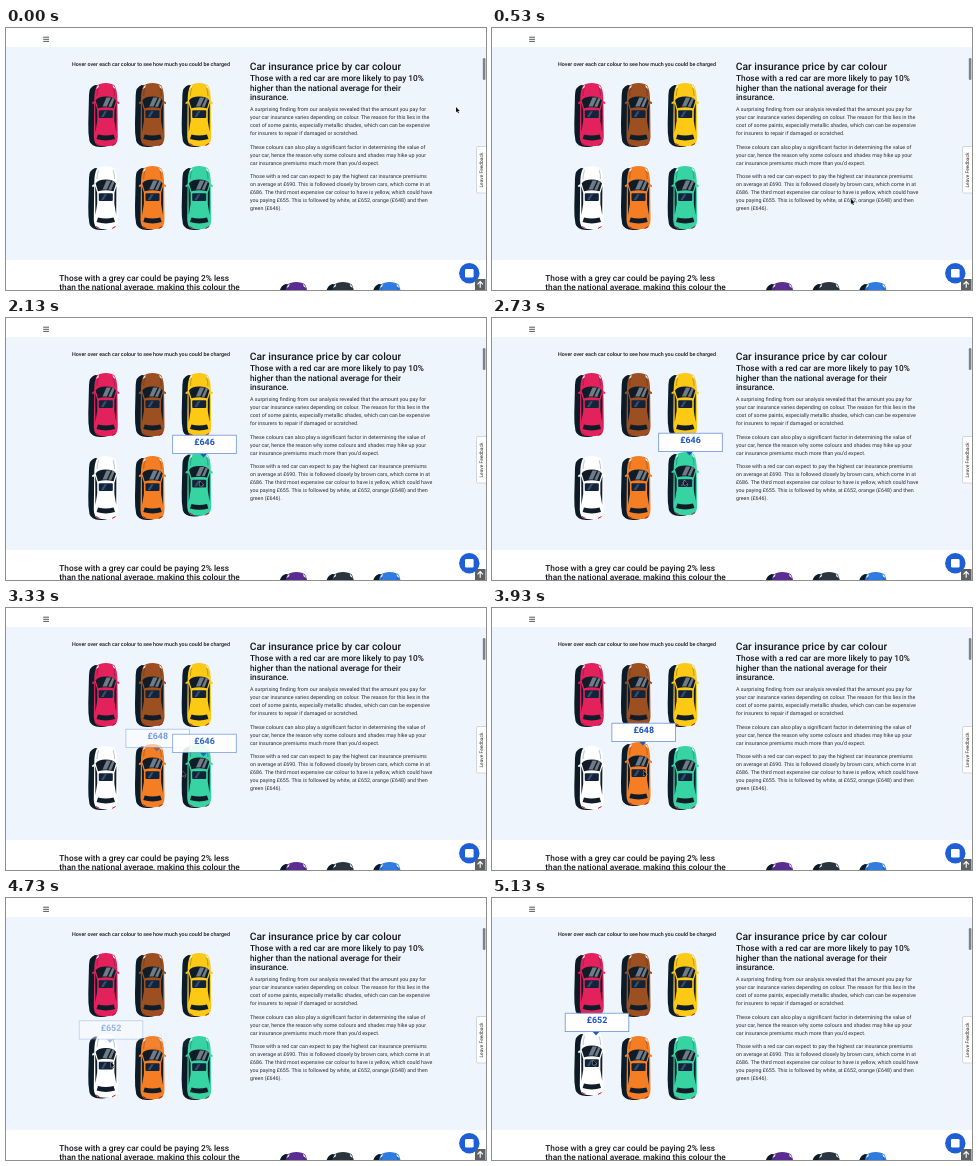
Write an HTML page that moves like this. It is 480 px wide and 262 px high and loops after 5190 ms.

```html
<!DOCTYPE html>
<html lang="en">
<head>
<meta charset="utf-8">
<title>Car insurance price by car colour</title>
<style>
html, body { margin: 0; width: 100%; height: 100%; overflow: hidden; background: #fff; }
svg { display: block; width: 100vw; height: 100vh; }
text { font-family: Roboto, Arial, sans-serif; text-rendering: geometricPrecision; white-space: pre; }
.title { font-size: 10.3px; font-weight: 500; fill: #15161c; }
.sub { font-size: 8.3px; font-weight: 500; fill: #15161c; }
.body { font-size: 5.333px; fill: #2b2d33; }
.hint { font-size: 5.333px; font-weight: 500; fill: #15161c; text-anchor: middle; }
.price { font-size: 8.9px; font-weight: 700; fill: #1c55c6; text-anchor: middle; }
.tab { font-size: 4.9px; fill: #333; text-anchor: middle; }
</style>
</head>
<body>
<svg id="stage" viewBox="0 0 480 262" preserveAspectRatio="none">
  <defs>
    <path id="shadow" d="M1 12Q1 4 7 2L24 4V60Q20 64.5 12 64Q3 63.500 1.500 58Q0 50 .3 40Z" fill="#0b1c28"/>
    <path id="shell" d="M9 2.500Q12 0 17.800 0T26.600 2.500Q29.300 7 29.400 18L29.800 54Q29.400 61 25.500 62.500Q18 64 10.200 62.500Q6.200 61 5.800 54L6.200 18Q6.300 7 9 2.500Z"/>
    <g id="trim">
      <path d="M8 6Q9 3 11 1.700L10.500 4.500ZM27.600 6Q26.600 3 24.600 1.700L25.100 4.500Z" fill="#eef3f6"/>
      <path d="M10.500 4.500Q9 8 9 13M25.100 4.500Q26.600 8 26.600 13" fill="none" stroke="#0b1c28" stroke-opacity=".45" stroke-width=".6"/>
      <path d="M7.600 17.500Q10 13.500 17.800 13.500T28 17.500L25.600 25.200Q17.800 23.500 10 25.200Z" fill="#101c28"/>
      <path d="M14.500 23.500L18.500 14.500H23L18.800 23.500ZM20.300 23.600L24.500 14.800L26.500 16L23.200 23.900Z" fill="#707b86"/>
      <path d="M7.200 20L9.200 27V38L7.400 49ZM28.400 20L26.400 27V38L28.200 49Z" fill="#101c28"/>
      <rect x="10.800" y="27.300" width="14" height="7.700" rx="1" fill="#13233a"/>
      <path d="M13 34L16.500 28.300H19L15.500 34Z" fill="#34506e"/>
      <path d="M10 51.500Q17.800 53.500 25.600 51.500L27 56Q17.800 58.800 8.600 56Z" fill="#101c28"/>
      <path d="M8 60.500L11.500 62.400M27.600 60.500L24.100 62.400" stroke="#b3172c" stroke-width="1"/>
    </g>
    <path id="mirror" d="M6.500 18L4.200 19.300V21L6.500 20.500ZM29.200 18L31.300 19.300V21L29.200 20.500Z"/>
  </defs>

  <rect width="480" height="262" fill="#fff"/>
  <rect y="19" width="480" height="213" fill="#eff5fd"/>
  <path d="M37.200 9.200H43M37.200 11.300H43M37.200 13.400H43" stroke="#444" stroke-width=".9"/>

  <g id="copy"></g>
  <g id="cars"></g>
  <g id="tips"></g>

  <rect x="476.800" y="30" width="2.600" height="22" rx="1.300" fill="#7d838b"/>
  <path d="M480.500 118.500H472Q470.500 118.500 470.500 120V163.500Q470.500 165 472 165H480.500Z" fill="#fff" stroke="#c4c9d0" stroke-width=".7"/>
  <text class="tab" transform="translate(477 142) rotate(-90)">Leave Feedback</text>
  <circle cx="463.300" cy="245.300" r="10.200" fill="#1f5fd6"/>
  <rect x="459" y="241" width="8.600" height="8.600" rx="1.300" fill="#fff"/>
  <rect x="469" y="251" width="10.500" height="11" fill="#5c5f63"/>
  <path d="M474.200 259.700V253.800M471.500 256.300L474.200 253.500L476.900 256.300" fill="none" stroke="#fff" stroke-width="1.100"/>

  <path id="cursor" d="M0 0V5.300L1.200 4.200L2.100 6.200L3 5.800L2.100 3.900H3.800Z" fill="#111" stroke="#fff" stroke-width=".5" paint-order="stroke"/>
</svg>
<script>
const LOOP = 5190, STEP = 200 / 3;
const $ = id => document.getElementById(id);

function add(parent, tag, attrs, text) {
  const el = document.createElementNS('http://www.w3.org/2000/svg', tag);
  for (const k in attrs) el.setAttribute(k, attrs[k]);
  if (text) el.textContent = text;
  return parent.appendChild(el);
}

function lines(cls, x, y, lead, rows) {
  rows.forEach((row, i) => add($('copy'), 'text', { class: cls, x, y: y + i * lead }, row));
}

lines('hint', 145, 38.4, 0, ['Hover over each car colour to see how much you could be charged']);
lines('title', 243.8, 42, 0, ['Car insurance price by car colour']);
lines('sub', 244, 53.3, 9.35, [
  'Those with a red car are more likely to pay 10%',
  'higher than the national average for their',
  'insurance.']);
lines('body', 244, 83.4, 8, [
  'A surprising finding from our analysis revealed that the amount you pay for',
  'your car insurance varies depending on colour. The reason for this lies in the',
  'cost of some paints, especially metallic shades, which can can be expensive',
  'for insurers to repair if damaged or scratched.']);
lines('body', 244, 120.7, 8, [
  'These colours can also play a significant factor in determining the value of',
  'your car, hence the reason why some colours and shades may hike up your',
  'car insurance premiums much more than you\u2019d expect.']);
lines('body', 244, 150, 8, [
  'Those with a red car can expect to pay the highest car insurance premiums',
  'on average at £690. This is followed closely by brown cars, which come in at',
  '£686. The third most expensive car colour to have is yellow, which could have',
  'you paying £655. This is followed by white, at £652, orange (£648) and then',
  'green (£646).']);
lines('sub', 53.3, 252.9, 9.35, [
  'Those with a grey car could be paying 2% less',
  'than the national average, making this colour the']);

function car(x, y, fill) {
  const g = add($('cars'), 'g', {});
  add(g, 'use', { href: '#shadow' });
  add(g, 'use', { href: '#mirror', fill });
  add(g, 'use', { href: '#shell', fill });
  add(g, 'use', { href: '#trim' });
  const lift = dy => g.setAttribute('transform', `translate(${x} ${y - dy})`);
  lift(0);
  return lift;
}

const row = (x, y, fills) => fills.map((fill, i) => car(x + i * 46.7, y, fill));
row(82, 55, ['#e3215c', '#9c4f20', '#fcc915']);
const [white, orange, green] = row(82, 138, ['#ffffff', '#f57e25', '#37d3a2']);
row(272.5, 254, ['#5c2d91', '#2b3540', '#2f7be0']);

function tip(x, price) {
  const g = add($('tips'), 'g', {});
  add(g, 'path', { d: 'M-5 18H3L-1 22.500Z', fill: '#1d58c4' });
  add(g, 'rect', { x: -31.8, y: .2, width: 63.6, height: 18.4, fill: '#fff', stroke: '#6c93d6', 'stroke-width': .8 });
  add(g, 'text', { class: 'price', y: 10 }, price);
  return (dy, opacity) => {
    g.setAttribute('transform', `translate(${x} ${115 + dy})`);
    g.setAttribute('opacity', opacity);
  };
}

// Rows of [time, ...values], eased between neighbours.
function at(keys, t) {
  if (t <= keys[0][0]) return keys[0].slice(1);
  const i = keys.findIndex(k => k[0] > t);
  if (i < 0) return keys[keys.length - 1].slice(1);
  const a = keys[i - 1], b = keys[i];
  const u = (t - a[0]) / (b[0] - a[0]), e = u * u * (3 - 2 * u);
  return a.slice(1).map((v, j) => v + (b[j + 1] - v) * e);
}

// Values: tooltip drop, tooltip opacity, car lift.
function hover(show, hide) {
  const keys = [[show, 12, 0, 0], [show + 200, 6, .55, 2], [show + 333, 2, 1, 3.6], [show + 420, 0, 1, 4]];
  if (hide) keys.push([hide, 0, 1, 4], [hide + 133, 11, .9, 2], [hide + 280, 16, 0, 0]);
  return keys;
}

const hovers = [
  [white, tip(105, '£652'), hover(4600)],
  [orange, tip(151.7, '£648'), hover(3133, 4470)],
  [green, tip(198.5, '£646'), hover(1800, 3200)]
];

const path = [
  [0, 450, 79], [800, 327, 203], [934, 327, 203], [1333, 231.5, 192.5], [1534, 231.5, 192.5],
  [2070, 194, 163], [2600, 192, 162], [3066, 193, 163], [3667, 153, 163], [3933, 151.5, 162.5],
  [4200, 150, 164], [4267, 150, 164], [4467, 121, 172], [4800, 103, 163], [5133, 101, 162]
];

function draw(now) {
  const t = Math.floor((now % LOOP + 5) / STEP) * STEP;
  for (const [lift, place, keys] of hovers) {
    const [dy, opacity, up] = at(keys, t);
    place(dy, opacity);
    lift(up);
  }
  $('cursor').setAttribute('transform', `translate(${at(path, t).join(' ')})`);
}

const start = performance.now();
function tick() {
  draw(performance.now() - start);
  requestAnimationFrame(tick);
}
tick();
</script>
</body>
</html>
```
